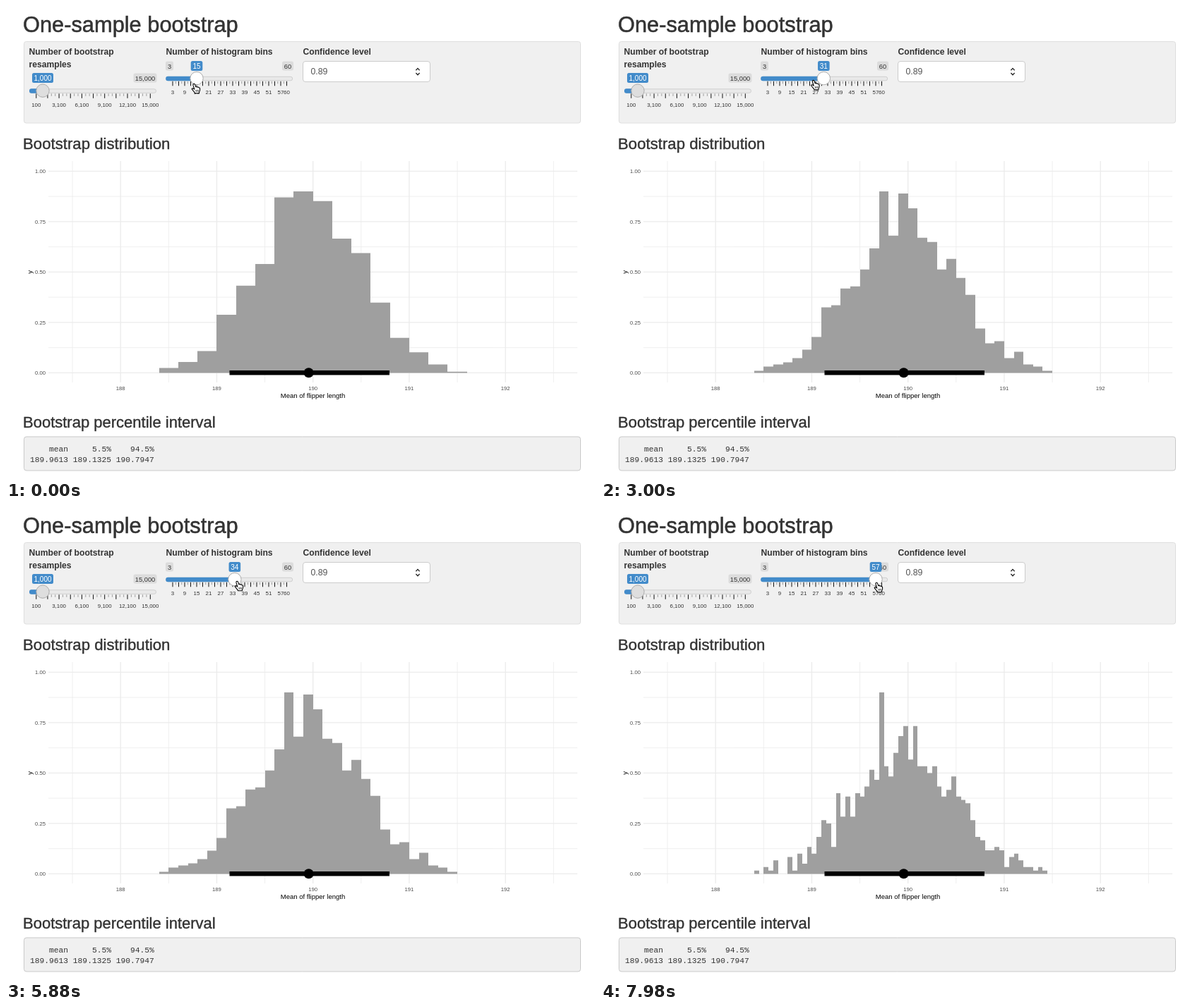
Animation of 834 by 671 pixels, one loop 8000 ms. Source, as an HTML page with a canvas:

```html
<!DOCTYPE html>
<html lang="en">
<head>
<meta charset="utf-8">
<title>One-sample bootstrap</title>
<style>
html, body { margin: 0; width: 100%; height: 100%; overflow: hidden; background: #fff; }
canvas { display: block; width: 834px; height: 671px; }
</style>
</head>
<body>
<canvas id="stage"></canvas>
<script>
const W = 834, H = 671, LOOP = 8000, STEP = 60;
const SANS = '"Liberation Sans", Arial, sans-serif';
const MONO = '"Liberation Mono", "Courier New", monospace';
const BLUE = '#428bca', INK = '#333';

const canvas = document.getElementById('stage');
const ctx = canvas.getContext('2d');
const dpr = window.devicePixelRatio || 1;
canvas.width = W * dpr;
canvas.height = H * dpr;

// Resample counts in bins of 0.05, starting at 188.4
const counts = [
  1, 0, 2, 1, 4, 0, 0, 5, 1, 6, 3, 8, 6, 11, 16, 15, 8, 24, 17, 23,
  17, 24, 23, 26, 31, 28, 54, 32, 29, 36, 41, 44, 34, 44, 32, 32, 30, 32, 26, 23,
  25, 29, 23, 22, 21, 16, 11, 10, 7, 7, 8, 7, 2, 5, 6, 4, 2, 2, 1, 2, 1
];

// Each move: start ms, end ms, value reached
const binMoves = { from: 15, moves: [[90, 690, 42], [690, 900, 40], [2640, 3275, 25], [4760, 5180, 34], [6120, 6820, 57]] };
const handX = { from: 269, moves: [[60, 640, 353], [660, 900, 344], [2520, 3060, 302], [4600, 4740, 306], [4740, 5140, 330], [6080, 6780, 393]] };
const handY = { from: 117, moves: [[60, 640, 113], [2520, 3060, 112], [6080, 6480, 114]] };
// Start ms, number of small bins merged into one bar
const plots = [[0, 4], [1320, 2], [3720, 4], [5580, 2], [7260, 1]];

const valueX = v => 162.2 + (v - 188) * 136.25;
const densityY = d => 520.4 - d * 286;
const binX = n => 227.5 + n * 17 / 6;

function track({ from, moves }, t) {
  let v = from;
  for (const [start, end, to] of moves) {
    if (t <= start) break;
    const p = Math.min(1, (t - start) / (end - start));
    v += (to - v) * p * p * (3 - 2 * p);
  }
  return v;
}

function text(s, x, y, size, { color = INK, align = 'left', weight = '', family = SANS, heavy = 0 } = {}) {
  ctx.font = `${weight} ${size}px ${family}`;
  ctx.textAlign = align;
  ctx.fillStyle = color;
  ctx.fillText(s, x, y);
  if (heavy) {
    ctx.strokeStyle = color;
    ctx.lineWidth = heavy;
    ctx.strokeText(s, x, y);
  }
}

function box(x, y, w, h, r, fill, border) {
  ctx.beginPath();
  ctx.roundRect(x, y, w, h, r);
  ctx.fillStyle = fill;
  ctx.fill();
  if (border) {
    ctx.strokeStyle = border;
    ctx.lineWidth = 1;
    ctx.stroke();
  }
}

function line(x1, y1, x2, y2, color, width) {
  ctx.beginPath();
  ctx.moveTo(x1, y1);
  ctx.lineTo(x2, y2);
  ctx.strokeStyle = color;
  ctx.lineWidth = width;
  ctx.stroke();
}

function tag(s, x, y, w, active) {
  box(x, y, w, active ? 14 : 13, 2.5, active ? BLUE : '#dcdcdc');
  text(s, x + w / 2, y + (active ? 10.8 : 10), active ? 10 : 9.3, { color: active ? '#fff' : INK, align: 'center' });
}

function slider(x, y, knobX, knobFill, majors, minors, labels) {
  box(x + .5, y - 2.5, 179, 5.5, 3, '#e9e9e9', '#cfcfcf');
  box(x, y - 3, knobX - x, 6.5, [3, 0, 0, 3], BLUE);
  const left = x + 9.8, span = 161.5, total = majors * (minors + 1);
  for (let i = 0; i <= total; i++) {
    const major = i % (minors + 1) === 0;
    const tx = left + span * i / total;
    line(tx, y + 4, tx, y + (major ? 10.5 : 7.5), major ? '#111' : '#888', major ? 1 : .8);
  }
  labels.forEach((s, i) => {
    const p = i === labels.length - 1 ? 1 : i * 2 / majors;
    text(s, left + span * p, y + 22.4, 7.9, { align: 'center' });
  });
  ctx.beginPath();
  ctx.arc(knobX, y - .2, 9.2, 0, Math.PI * 2);
  ctx.fillStyle = knobFill;
  ctx.fill();
  ctx.strokeStyle = '#ababab';
  ctx.lineWidth = 1;
  ctx.stroke();
}

function chevron(x, y, dir) {
  ctx.beginPath();
  ctx.moveTo(x - 2.6, y);
  ctx.lineTo(x, y + 2.8 * dir);
  ctx.lineTo(x + 2.6, y);
  ctx.strokeStyle = '#222';
  ctx.lineWidth = 1.3;
  ctx.stroke();
}

function controls(bins) {
  box(25.5, 50.5, 788, 115.5, 3, '#f0f0f0', '#dedede');
  const bold = { weight: 'bold' };
  text('Number of bootstrap', 32.5, 69.3, 12.15, bold);
  text('resamples', 32.5, 86.8, 12.15, bold);
  text('Number of histogram bins', 226.5, 69.3, 12.15, bold);
  text('Confidence level', 420.5, 69.3, 12.15, bold);

  tag('15,000', 180.5, 95.5, 33, false);
  tag('1,000', 37, 95, 30, true);
  slider(33, 120.3, 52, '#dedede', 10, 2, ['100', '3,100', '6,100', '9,100', '12,100', '15,000']);

  const knobX = binX(bins);
  tag('3', 226, 78.5, 11, false);
  tag('60', 391, 78.5, 16, false);
  tag(String(bins), knobX - 8.3, 78, 16.6, true);
  const labels = Array.from({ length: 10 }, (_, i) => String(3 + 6 * i));
  slider(226.2, 102.8, knobX, '#fff', 19, 1, [...labels, '60']);

  box(420.5, 78.5, 180, 29, 3.5, '#fff', '#cbcbcb');
  text('0.89', 431.5, 97.4, 12.3, { color: '#555' });
  chevron(583, 91.2, -1);
  chevron(583, 95, 1);
}

function histogram(merge) {
  const bars = [];
  counts.forEach((n, i) => {
    const k = Math.floor(i / merge);
    bars[k] = (bars[k] || 0) + n;
  });
  const peak = Math.max(...bars), base = densityY(0);
  const edge = k => Math.round(valueX(188.4 + k * merge * .05));
  ctx.fillStyle = '#9f9f9f';
  ctx.beginPath();
  bars.forEach((n, k) => {
    if (!n) return;
    const y = densityY(.9 * n / peak);
    ctx.rect(edge(k), y, edge(k + 1) - edge(k), base - y);
  });
  ctx.fill();
}

function chart(merge) {
  const grid = '#ebebeb', gray = '#4d4d4d';
  for (let i = 0; i < 11; i++) {
    const x = valueX(187.5 + i * .5);
    const major = i % 2 === 1;
    line(x, 220, x, 534, grid, major ? 1.3 : .8);
    if (major) text(String(187.5 + i * .5), x, 544.5, 7.7, { color: gray, align: 'center' });
  }
  for (let i = 0; i < 9; i++) {
    const y = densityY(i / 8);
    const major = i % 2 === 0;
    line(60, y, 809, y, grid, major ? 1.3 : .8);
    if (major) text((i / 8).toFixed(2), 56, y + 2.8, 7.7, { color: gray, align: 'right' });
  }
  histogram(merge);
  const y = densityY(0) - .2;
  line(valueX(189.1325), y, valueX(190.7947), y, '#000', 6.6);
  ctx.beginPath();
  ctx.arc(valueX(189.9613) - .8, y, 7, 0, Math.PI * 2);
  ctx.fillStyle = '#000';
  ctx.fill();

  text('Mean of flipper length', 434.5, 555.7, 9.5, { color: '#000', align: 'center' });
  ctx.save();
  ctx.translate(36.5, 377.3);
  ctx.rotate(-Math.PI / 2);
  text('y', 0, 0, 9.5, { color: '#000', align: 'center' });
  ctx.restore();
}

const handShape = new Path2D('M-2.2 1.2L-4-4.6Q-4.3-6.6-2.8-6.7Q-1.6-6.7-1.2-5.2L-.3-2.2Q.9-3.2 1.9-1.9Q3.1-2.6 3.8-1.3Q5.4-1.5 5.6 .3Q5.9 3.2 4.6 5L4.4 6.8L-1.4 6.8Q-2.2 5-3.6 3.6L-5.6 1.2Q-6.2-.3-4.6-.3Q-3.4 0-2.2 1.2Z');
const handFolds = new Path2D('M-.2 2L.1 4.8M1.6 1.9L1.8 4.7M3.3 1.8L3.4 4.6');

function hand(x, y) {
  ctx.save();
  ctx.translate(x, y);
  ctx.lineJoin = 'round';
  ctx.fillStyle = '#fff';
  ctx.fill(handShape);
  ctx.strokeStyle = '#000';
  ctx.lineWidth = 1.1;
  ctx.stroke(handShape);
  ctx.lineWidth = .7;
  ctx.stroke(handFolds);
  ctx.restore();
}

function draw(t) {
  ctx.setTransform(dpr, 0, 0, dpr, 0, 0);
  ctx.fillStyle = '#fff';
  ctx.fillRect(0, 0, W, H);

  text('One-sample bootstrap', 24, 36.8, 30.8, { heavy: .55 });
  controls(Math.round(track(binMoves, t)));

  text('Bootstrap distribution', 24, 203.2, 22.2, { heavy: .4 });
  chart(plots.filter(p => p[0] <= t).pop()[1]);

  text('Bootstrap percentile interval', 24, 598.3, 22, { heavy: .4 });
  box(25.5, 611, 788, 48, 3.5, '#f0f0f0', '#c9c9c9');
  const mono = { family: MONO };
  text('    mean     5.5%    94.5%', 34, 632, 11.28, mono);
  text('189.9613 189.1325 190.7947', 34, 647.2, 11.28, mono);

  hand(track(handX, t), track(handY, t));
}

const began = performance.now();
function tick() {
  const t = (performance.now() - began) % LOOP;
  draw(Math.floor(t / STEP) * STEP);
  requestAnimationFrame(tick);
}
tick();
</script>
</body>
</html>
```
